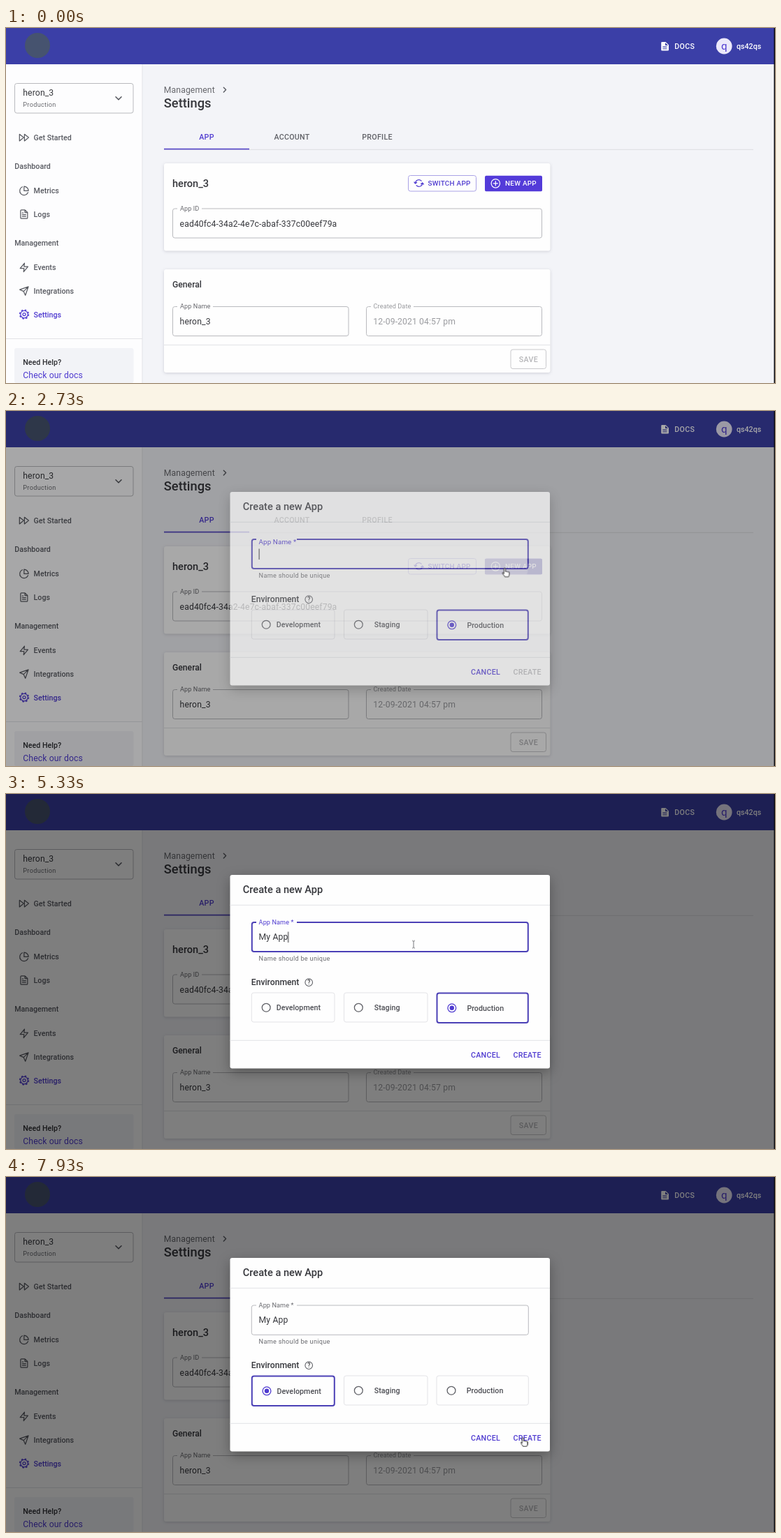
Recreate the animation shown at these times as an HTML page. Size 1100 by 509 pixels, loop 8 s.

```html
<!DOCTYPE html>
<html lang="en">
<head>
<meta charset="utf-8">
<title>Create a new App</title>
<style>
html, body { margin: 0; width: 100%; height: 100%; overflow: hidden; background: #f3f4f8; }
svg { display: block; width: 1100px; height: 509px; }
text { font: 400 12.2px Roboto, Arial, sans-serif; fill: #36373c; white-space: pre; }

/* type styles */
.body { letter-spacing: .00938em; }
.cap { font-size: 9.14px; letter-spacing: .03333em; fill: #6a6b70; }
.label { font-size: 9.14px; letter-spacing: .00938em; fill: #68696e; }
.nav { font-size: 10.67px; font-weight: 500; fill: #585a61; }
.btn { font-size: 10.67px; font-weight: 500; letter-spacing: .02857em; }
.small { font-size: 9.9px; }
.h5 { font-size: 18.3px; font-weight: 500; }
.h6 { font-size: 14.6px; font-weight: 500; }
.h7 { font-weight: 500; }
.opt { font-size: 10.67px; font-weight: 500; letter-spacing: .005em; fill: #4c4d53; }
.violet { fill: #4f3bd0; }
.white { fill: #fff; }
.dim { fill: #9b9ca0; }
.off { fill: #b6b6b9; }
.mid { text-anchor: middle; }

.icon { fill: none; stroke: #585a61; stroke-width: 1.25; stroke-linecap: round; stroke-linejoin: round; }
.feather { stroke-width: 2; }
.line { fill: none; stroke: #b9babe; }
.rule { stroke: #e2e3e7; }
.card { fill: #fefefe; filter: drop-shadow(0 1px 2px rgba(30, 30, 60, .17)); }
.faint { fill: none; stroke: #e3e3e7; }
.bold { fill: none; stroke: #4b40b6; stroke-width: 2; }
.radio { fill: none; stroke: #606167; stroke-width: 1.3; }
.on { stroke: #4f3bd0; }

/* modal */
#scrim, #modal { animation: show 225ms cubic-bezier(.4, 0, .2, 1) 2640ms both; }
#paper { fill: #fefefe; filter: drop-shadow(0 6px 9px rgba(0, 0, 0, .3)); }
#tag { transform-origin: 361.6px 187px; animation: shrink 200ms cubic-bezier(0, 0, .2, 1) 2655ms both; }
@keyframes show { from { opacity: 0; } }
@keyframes hide { to { opacity: 0; } }
@keyframes shrink { from { transform: translateY(14px) scale(1.333); } }

/* one-shot switches, set off by --at */
.in { animation: show 1ms linear var(--at) both; }
.out { animation: hide 1ms linear var(--at) both; }
.fadein { animation: show 150ms ease-out var(--at) both; }
.fadeout { animation: hide 150ms ease-out var(--at) both; }
.grow { animation: grow 150ms ease-out var(--at) both; transform-origin: 373px 306.8px; }
@keyframes grow { from { transform: scale(0); } }

#hover { animation: show 220ms ease-in-out 1750ms both; }
#ripple { transform-origin: 713.5px 224px; animation: ripple 550ms cubic-bezier(.4, 0, .2, 1) 2560ms both; }
@keyframes ripple {
  from { transform: scale(0); opacity: .28; }
  70% { transform: scale(1); opacity: .28; }
  to { transform: scale(1); opacity: 0; }
}
#over { animation: over 8s step-end both; }
@keyframes over { 0% { opacity: 0; } 18.1% { opacity: 1; } 20.4%, 100% { opacity: 0; } }

/* caret */
#caret { animation: advance 8s step-end both, blink 8s step-end both; }
@keyframes advance {
  0% { transform: none; }
  48.3% { transform: translateX(10.6px); }
  51.6% { transform: translateX(16.4px); }
  55.8% { transform: translateX(19.5px); }
  59.1% { transform: translateX(27.6px); }
  61.6% { transform: translateX(34.6px); }
  63.3%, 100% { transform: translateX(41.6px); }
}
@keyframes blink {
  0% { opacity: 1; }
  39.1% { opacity: 0; }
  45.8% { opacity: 1; }
  70% { opacity: 0; }
  75.8% { opacity: 1; }
  82.5%, 100% { opacity: 0; }
}
tspan { animation: ink 1ms linear var(--at) both; }
@keyframes ink { from { fill-opacity: 0; } }

/* pointer */
#pointer { animation: travel 8s ease-in-out both; }
@keyframes travel {
  0%, 14.1% { transform: translate(690px, 338px); }
  24.1%, 35.8% { transform: translate(713.5px, 225.5px); }
  41.6%, 66.6% { transform: translate(583px, 215.5px); }
  72.5% { transform: translate(531px, 337px); }
  76.6%, 78.4% { transform: translate(490px, 316px); }
  79.1% { transform: translate(487px, 312.5px); }
  83.7% { transform: translate(430px, 325px); }
  86.6%, 89.1% { transform: translate(404px, 311px); }
  99.1%, 100% { transform: translate(739.5px, 374px); }
}
#arrow { animation: arrow 8s step-end both; }
#beam { animation: beam 8s step-end both; }
#hand { animation: hand 8s step-end both; }
@keyframes arrow {
  0% { opacity: 0; } 14.1% { opacity: 1; } 18.1% { opacity: 0; } 20.4% { opacity: 1; } 22.3% { opacity: 0; }
  68.3% { opacity: 1; } 70% { opacity: 0; } 71.6% { opacity: 1; } 74.9% { opacity: 0; }
  92.4% { opacity: 1; } 96.6%, 100% { opacity: 0; }
}
@keyframes beam {
  0% { opacity: 0; } 18.1% { opacity: 1; } 20.4% { opacity: 0; }
  36.6% { opacity: 1; } 68.3%, 100% { opacity: 0; }
}
@keyframes hand {
  0% { opacity: 0; } 22.3% { opacity: 1; } 36.6% { opacity: 0; }
  70% { opacity: 1; } 71.6% { opacity: 0; } 74.9% { opacity: 1; }
  92.4% { opacity: 0; } 96.6%, 100% { opacity: 1; }
}
</style>
</head>
<body>
<svg viewBox="0 0 1100 509">
  <defs><clipPath id="pill"><rect x="685" y="211.5" width="82" height="23" rx="2.5"/></clipPath></defs>

  <rect width="1100" height="509" fill="#f3f4f8"/>

  <!-- sidebar -->
  <rect y="52" width="195" height="457" fill="#fdfdfe"/>
  <path class="rule" d="M195 52V509M0 445.5H195"/>
  <rect class="line" x="12.5" y="79.5" width="169.5" height="42.5" rx="3"/>
  <text class="body" x="24.3" y="97">heron_3</text>
  <text class="cap" x="24.3" y="113.3">Production</text>
  <path class="icon" d="M157 98.8l4 4 4-4" style="stroke-width:1.6"/>
  <path class="icon" d="M19.3 152.3l6 4.8-6 4.8zM26.4 152.3l6 4.8-6 4.8z"/>
  <text class="nav" x="39.6" y="161">Get Started</text>
  <text class="nav" x="12.2" y="202.3">Dashboard</text>
  <path class="icon feather" transform="translate(18.4 226) scale(.62)" d="M21.2 15.9A10 10 0 1 1 8 2.8M22 12A10 10 0 0 0 12 2v10z"/>
  <text class="nav" x="39.6" y="237.4">Metrics</text>
  <path class="icon feather" transform="translate(18.4 259.6) scale(.62)" d="M14 2H6a2 2 0 0 0-2 2v16a2 2 0 0 0 2 2h12a2 2 0 0 0 2-2V8zM14 2v6h6M16 13H8M16 17H8M10 9H8"/>
  <text class="nav" x="39.6" y="271">Logs</text>
  <text class="nav" x="12.2" y="312.3">Management</text>
  <path class="icon feather" transform="translate(18.4 336) scale(.62)" d="M13 2L3 14h9l-1 8 10-12h-9z"/>
  <text class="nav" x="39.6" y="347.4">Events</text>
  <path class="icon feather" transform="translate(18.4 369.6) scale(.62)" d="M22 2L11 13M22 2l-7 20-4-9-9-4z"/>
  <text class="nav" x="39.6" y="381">Integrations</text>
  <g class="icon on">
    <circle cx="26" cy="410.6" r="5.2"/>
    <circle cx="26" cy="410.6" r="6.4" stroke-width="1.5" stroke-linecap="butt" stroke-dasharray="2.5 2.53"/>
    <circle cx="26" cy="410.6" r="2"/>
  </g>
  <text class="nav violet" x="39.6" y="414.5">Settings</text>
  <rect x="12" y="459" width="170.5" height="50" rx="3" fill="#f2f3f7"/>
  <text class="nav" x="24.3" y="483" style="fill:#2b2c30">Need Help?</text>
  <text class="body violet" x="24.3" y="502">Check our docs</text>

  <!-- top bar -->
  <rect width="1100" height="52" fill="#3b3fa7"/>
  <circle cx="45" cy="25" r="18" fill="#46536f"/>
  <path fill="#fff" fill-rule="evenodd" d="M938.4 20h5.2l4.4 4.3v7a1.2 1.2 0 0 1-1.2 1.2h-8.4a1.2 1.2 0 0 1-1.2-1.2v-10.1a1.2 1.2 0 0 1 1.2-1.2zM943 21v4h4zM939.4 26.6h6v1.1h-6zM939.4 29.2h6v1.1h-6z"/>
  <text class="btn white" x="956.3" y="30">DOCS</text>
  <circle cx="1027.2" cy="26" r="11.4" fill="#ebe8fa"/>
  <text class="mid violet" x="1027.2" y="30.8" style="font-size:15.2px">q</text>
  <text class="nav" x="1045" y="30" style="fill:#fff">qs42qs</text>

  <!-- heading and tabs -->
  <text class="body" x="225.8" y="92.5" style="fill:#66676c">Management</text>
  <path class="icon" d="M311.3 85.3l3.3 3.3-3.3 3.3" style="stroke-width:1.4"/>
  <text class="h5" x="225.8" y="114.4">Settings</text>
  <path class="rule" d="M226 174.3H1069" style="stroke:#dcdde2"/>
  <rect x="226" y="172.7" width="122" height="1.7" fill="#5748c8"/>
  <text class="btn violet mid" x="287" y="159.5">APP</text>
  <text class="btn mid" x="409" y="159.5" style="fill:#606167">ACCOUNT</text>
  <text class="btn mid" x="531" y="159.5" style="fill:#606167">PROFILE</text>

  <!-- app card -->
  <rect class="card" x="226" y="194" width="552.5" height="125.5" rx="3"/>
  <text class="h6" x="238" y="227.6">heron_3</text>
  <rect x="575.5" y="211.5" width="97" height="22.5" rx="3" fill="none" stroke="#aaa2e6"/>
  <path class="icon on" d="M585.5 222.5a5 5 0 0 1 8.6-3.3M584 221l1.5 2 2-1.6M595.7 222.5a5 5 0 0 1-8.6 3.3M593.7 223.6l2-1.6 1.6 2"/>
  <text class="btn small violet" x="603.5" y="226.2">SWITCH APP</text>
  <g clip-path="url(#pill)">
    <rect x="685" y="211.5" width="82" height="23" fill="#533bd9"/>
    <rect id="hover" x="685" y="211.5" width="82" height="23" fill="#3b309f"/>
    <circle id="ripple" cx="713.5" cy="224" r="46" fill="#fff"/>
  </g>
  <g class="icon" style="stroke:#fff">
    <circle cx="700.3" cy="222.8" r="6.2"/>
    <path d="M697.2 222.8h6.2M700.3 219.7v6.2"/>
  </g>
  <text class="btn small white" x="714" y="226.2">NEW APP</text>
  <rect class="line" x="238.5" y="259" width="528" height="42" rx="3"/>
  <rect id="over" class="line" x="238.5" y="259" width="528" height="42" rx="3" style="stroke:#3c3d42"/>
  <rect x="245" y="257" width="35" height="4" fill="#fefefe"/>
  <text class="label" x="249" y="262">App ID</text>
  <text class="body" x="248.6" y="284.8">ead40fc4-34a2-4e7c-abaf-337c00eef79a</text>

  <!-- general card -->
  <rect class="card" x="226" y="346" width="552.5" height="148" rx="3"/>
  <text class="h7" x="238" y="371.7">General</text>
  <rect class="line" x="238.5" y="399.5" width="251.5" height="42" rx="3"/>
  <rect class="line" x="515.5" y="399.5" width="251" height="42" rx="3"/>
  <rect x="245" y="397" width="51" height="5" fill="#fefefe"/>
  <rect x="522" y="397" width="61" height="5" fill="#fefefe"/>
  <text class="label" x="249" y="402.3">App Name</text>
  <text class="label" x="525.6" y="402.3" style="fill:#98999d">Created Date</text>
  <text class="body" x="248.6" y="425.2">heron_3</text>
  <text class="body dim" x="525.3" y="425.2">12-09-2021 04:57 pm</text>
  <path class="rule" d="M226 454.5H778.5"/>
  <rect class="line" x="722" y="461" width="50.5" height="27.5" rx="3" style="stroke:#c9c9cc"/>
  <text class="btn off mid" x="747.4" y="478.8">SAVE</text>

  <rect id="scrim" width="1100" height="509" fill="rgba(0,0,0,.5)"/>

  <!-- dialog -->
  <g id="modal">
    <rect id="paper" x="320.5" y="116" width="457.5" height="277.5" rx="3"/>
    <text class="h6" x="338.8" y="142">Create a new App</text>
    <path class="rule" d="M320.5 159.3H778M320.5 353.3H778"/>

    <rect class="line fadein" style="--at:7000ms" x="351.3" y="184" width="396" height="42.3" rx="3"/>
    <rect class="bold fadeout" style="--at:7000ms" x="351.8" y="184" width="395" height="42" rx="3"/>
    <rect x="358" y="182" width="58" height="5" fill="#fefefe"/>
    <g id="tag">
      <text class="label fadein" style="--at:7000ms" x="361.6" y="187.3">App Name *</text>
      <text class="label violet fadeout" style="--at:7000ms" x="361.6" y="187.3">App Name *</text>
    </g>
    <text class="body" x="361.6" y="209.4"><tspan style="--at:3870ms">M</tspan><tspan style="--at:4130ms">y </tspan><tspan style="--at:4730ms">A</tspan><tspan style="--at:4930ms">p</tspan><tspan style="--at:5070ms">p</tspan></text>
    <g class="out" style="--at:7000ms"><rect id="caret" x="361.6" y="197.5" width="1" height="15.5" fill="#28292d"/></g>
    <text class="cap" x="361.6" y="239">Name should be unique</text>

    <text class="h7" x="350.8" y="274.2">Environment</text>
    <circle class="radio" cx="433.2" cy="270.2" r="5.3" style="stroke-width:1.1"/>
    <text class="mid" x="433.2" y="273.2" style="font-size:8.4px;font-weight:500">?</text>

    <g class="out" style="--at:7000ms">
      <rect class="faint" x="351.3" y="285" width="118.7" height="42" rx="3"/>
      <circle class="radio" cx="372.2" cy="306.2" r="5.9"/>
      <text class="opt" x="386.7" y="310">Development</text>
    </g>
    <g class="in" style="--at:7000ms">
      <rect class="bold" x="351.8" y="285.5" width="118" height="42.5" rx="3"/>
      <circle class="radio on" cx="373" cy="306.8" r="5.9"/>
      <circle class="violet grow" style="--at:7000ms" cx="373" cy="306.8" r="3.2"/>
      <text class="opt" x="387.4" y="310.7">Development</text>
    </g>

    <rect class="faint" x="483.5" y="285" width="119.5" height="42" rx="3"/>
    <circle class="radio" cx="504.3" cy="306.2" r="5.9"/>
    <text class="opt" x="526.7" y="310">Staging</text>

    <g class="in" style="--at:7000ms">
      <rect class="faint" x="616" y="285" width="131.3" height="42" rx="3"/>
      <circle class="radio" cx="637" cy="306.2" r="5.9"/>
      <text class="opt" x="658.7" y="310">Production</text>
    </g>
    <g class="out" style="--at:7000ms">
      <rect class="bold" x="616.5" y="285.5" width="130.3" height="42.5" rx="3"/>
      <circle class="radio on" cx="637.8" cy="306.8" r="5.9"/>
      <circle class="violet" cx="637.8" cy="306.8" r="3.2"/>
      <text class="opt" x="659.4" y="310.7">Production</text>
    </g>

    <text class="btn violet mid" x="686" y="377.9">CANCEL</text>
    <text class="btn off mid out" style="--at:3870ms" x="745.7" y="377.9">CREATE</text>
    <text class="btn violet mid in" style="--at:3870ms" x="745.7" y="377.9">CREATE</text>
  </g>

  <g id="pointer">
    <path id="arrow" fill="#111" stroke="#fff" stroke-width=".8" d="M0 0V12.2L2.8 9.6 4.7 13.8 6.6 13 4.8 8.9H8.6z"/>
    <path id="beam" fill="none" stroke="#77787c" d="M-2-5.3Q0-5.3 0-4V4Q0 5.3-2 5.3M2-5.3Q0-5.3 0-4M0 4Q0 5.3 2 5.3"/>
    <path id="hand" fill="#fff" stroke="#222" stroke-width=".9" stroke-linejoin="round" d="M-1.2 8V1a1.1 1.1 0 0 1 2.2 0V5a1 1 0 0 1 1.9.2a1 1 0 0 1 1.8.3a.9.9 0 0 1 1.7.5V9q0 1.5-1 3.2H0q-.8-1.6-3.2-4.6q-.8-1.3.4-1.4q.7 0 1.6 1.8z"/>
  </g>

  <rect x="1098.5" width="1.5" height="509" fill="#0c0c10"/>
</svg>
<script>
// The keyframes hold the motion; this loops them on a 15 fps clock.
const LOOP = 8000, FPS = 15;
const anims = document.getAnimations();
anims.forEach(a => a.pause());
const start = performance.now();

function tick() {
  const ms = (performance.now() - start) % LOOP;
  const step = Math.floor((ms + 4) * FPS / 1000) % (LOOP * FPS / 1000);
  const time = step * 1000 / FPS + 5;
  anims.forEach(a => { a.currentTime = time; });
  requestAnimationFrame(tick);
}
tick();
</script>
</body>
</html>
```
